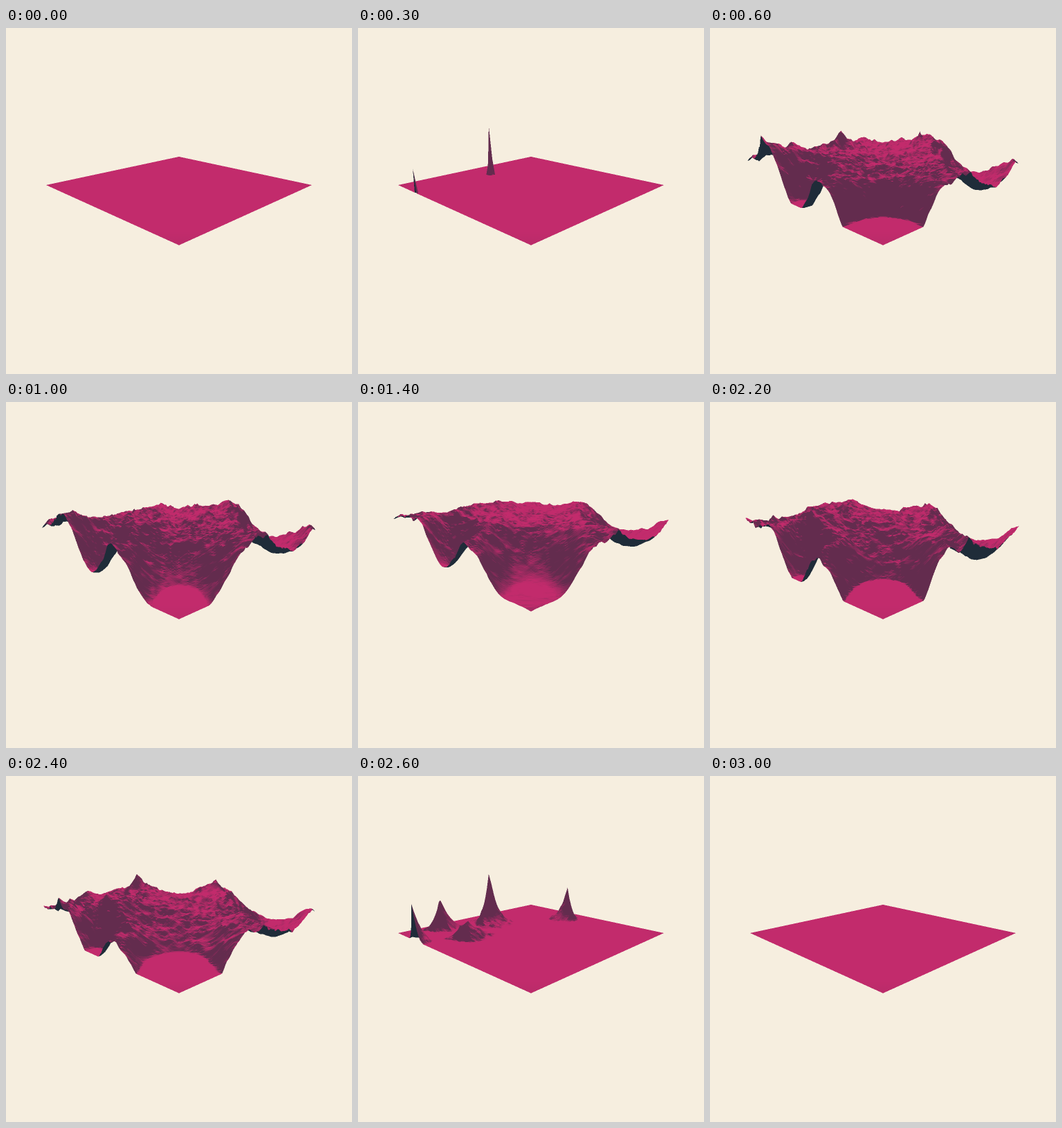
Animation, 500 px wide and 500 px high, one loop 3100 ms. Source, as an HTML page with a canvas:

```html
<!DOCTYPE html>
<html lang="en">
<head>
<meta charset="utf-8">
<title>Terrain</title>
<style>
  html, body { margin: 0; width: 100%; height: 100%; overflow: hidden; background: #f6eedf; }
  canvas { display: block; width: 500px; height: 500px; }
</style>
</head>
<body>
<canvas id="stage" width="500" height="500"></canvas>
<script>
const LOOP = 3100, STEP = 100, MIDDLE = 1500;
const N = 110, V = N + 1;          // grid cells and vertices per side
const SIZE = 1000;                 // supersampled buffer
const PEAK = 0.4, LIGHT = 2, RIM = 0.76;
const PINK = [194, 43, 108], SLATE = [31, 44, 57], PAPER = [246, 238, 223];

const clamp = (x, a = 0, b = 1) => Math.min(b, Math.max(a, x));
const mix = (a, b, k) => a + (b - a) * k;
const smooth = x => { x = clamp(x); return x * x * (3 - 2 * x); };
const pack = c => (255 << 24 | c[2] << 16 | c[1] << 8 | c[0]) >>> 0;

// Hollows sunk into the plateau; the front one deepens backwards over time
const hollows = t => [
  { l: 0, d: -0.86, floor: 0.13, rim: 0.42, reach: mix(0.75, 1.9, smooth((t - 500) / 500)), depth: 1 },
  { l: -0.53, d: -0.42, floor: 0, rim: 0.24, reach: 1.3, depth: 0.85 },
  { l: 0.7, d: 0.05, floor: 0, rim: 0.34, reach: 2, depth: 0.75 },
  { l: 0.02, d: 0.95, floor: 0, rim: 0.25, reach: 1, depth: 0.45 }
];
// Hills, each with a sharp summit that outlasts the rest
const summits = [
  { l: -0.334, d: 0.3, h: 0.4, r: 0.06 },
  { l: 0.307, d: 0.436, h: 0.3, r: 0.05 },
  { l: -0.7, d: 0.13, h: 0.28, r: 0.075 },
  { l: -0.81, d: -0.19, h: 0.31, r: 0.05 },
  { l: -0.45, d: -0.12, h: 0.15, r: 0.1 }
];

// Everything below this level is flattened
const cutLevel = s => 1.35 * (s / 1250) ** 2.5 - 0.12;

function hash(i, j, k) {
  let h = Math.imul(i, 374761393) ^ Math.imul(j, 668265263) ^ Math.imul(k, 1274126177);
  h = Math.imul(h ^ h >>> 13, 1274126177);
  return ((h ^ h >>> 16) >>> 0) / 2147483648 - 1;
}

function noise(x, y, z) {
  const i = Math.floor(x), j = Math.floor(y), k = Math.floor(z);
  const u = smooth(x - i), v = smooth(y - j), w = smooth(z - k);
  const row = (b, c) => mix(hash(i, b, c), hash(i + 1, b, c), u);
  const slab = c => mix(row(j, c), row(j + 1, c), v);
  return mix(slab(k), slab(k + 1), w);
}

// One soft octave, then sharp-crested ones
function rough(x, y, z) {
  let sum = 0, amp = 0.5, f = 4.5;
  for (let o = 0; o < 4; o++) {
    const n = noise(x * f + 31, y * f + 17, z + o * 7);
    sum += amp * (o ? 1.5 * (0.35 - Math.abs(n)) : n);
    amp *= 0.55;
    f *= 2;
  }
  return sum;
}

function land(l, d, basins) {
  let n = RIM;
  for (const s of summits) n += 0.15 * Math.exp(-((l - s.l) ** 2 + (d - s.d) ** 2) / 0.04);
  for (const b of basins) {
    const q = Math.hypot(l - b.l, (d - b.d) / b.reach);
    n *= 1 - b.depth * (1 - smooth((q - b.floor) / (b.rim - b.floor)));
  }
  return n;
}

const grid = () => new Float32Array(V * V);
const L = grid(), D = grid(), H = grid(), X = grid(), Y = grid(), Z = grid(), spike = grid();
for (let a = 0, i = 0; a < V; a++) {
  for (let b = 0; b < V; b++, i++) {
    L[i] = (a - b) / N;
    D[i] = 1 - (a + b) / N;
    for (const s of summits) {
      spike[i] = Math.max(spike[i], s.h * Math.exp(-Math.hypot(L[i] - s.l, D[i] - s.d) / s.r));
    }
  }
}

function shape(t) {
  const s = Math.abs(t - MIDDLE), cut = cutLevel(s), late = smooth((s - 750) / 300);
  const basins = hollows(t);
  let top = -1;
  for (let i = 0; i < H.length; i++) {
    const n = land(L[i], D[i], basins);
    const m = n + (0.05 + 0.4 * n) * rough(L[i], D[i], t / 900);
    H[i] = mix(m, 0.8, 0.8 * late) + late * spike[i];
    top = Math.max(top, H[i]);
  }
  const k = top > cut ? PEAK / (top - cut) : 0;
  const f = SIZE * 0.384;
  for (let i = 0; i < H.length; i++) {
    H[i] = Math.max(0, H[i] - cut) * k;
    Z[i] = 1 + 0.359 * D[i] - 0.127 * H[i];
    X[i] = SIZE / 2 + f * L[i] / Z[i];
    Y[i] = SIZE / 2 - f * (0.3333 * D[i] + 0.943 * H[i] + 0.12) / Z[i];
  }
}

const ctx = document.getElementById("stage").getContext("2d");
const big = document.createElement("canvas");
big.width = big.height = SIZE;
const bigCtx = big.getContext("2d");
const image = bigCtx.createImageData(SIZE, SIZE);
const pixels = new Uint32Array(image.data.buffer);
const depth = new Float32Array(SIZE * SIZE);
const paper = pack(PAPER), under = pack(SLATE);

function shade(p, q, r) {
  const ax = L[q] - L[p], ay = D[q] - D[p], az = H[q] - H[p];
  const bx = L[r] - L[p], by = D[r] - D[p], bz = H[r] - H[p];
  const nx = az * by - ay * bz, ny = ax * bz - az * bx, nz = ay * bx - ax * by;
  const lx = -(L[p] + L[q] + L[r]) / 3, ly = -(D[p] + D[q] + D[r]) / 3;
  const lz = LIGHT - (H[p] + H[q] + H[r]) / 3;
  const dot = (nx * lx + ny * ly + nz * lz) / (Math.hypot(nx, ny, nz) * Math.hypot(lx, ly, lz));
  const k = clamp(1.9 * dot - 0.75, 0.42, 1);
  return pack(PINK.map((c, i) => Math.round(mix(SLATE[i], c, k))));
}

function triangle(p, q, r) {
  const x0 = X[p], y0 = Y[p], x1 = X[q], y1 = Y[q], x2 = X[r], y2 = Y[r];
  const area = (x1 - x0) * (y2 - y0) - (y1 - y0) * (x2 - x0);
  if (Math.abs(area) < 1e-6) return;
  const color = area > 0 ? shade(p, q, r) : under;
  const left = Math.ceil(Math.min(x0, x1, x2) - 0.5), right = Math.floor(Math.max(x0, x1, x2) - 0.5);
  const up = Math.ceil(Math.min(y0, y1, y2) - 0.5), down = Math.floor(Math.max(y0, y1, y2) - 0.5);
  for (let y = up; y <= down; y++) {
    for (let x = left; x <= right; x++) {
      const px = x + 0.5, py = y + 0.5;
      const u = ((px - x0) * (y2 - y0) - (py - y0) * (x2 - x0)) / area;
      const v = ((x1 - x0) * (py - y0) - (y1 - y0) * (px - x0)) / area;
      if (u < -1e-5 || v < -1e-5 || u + v > 1.00001) continue;
      const z = Z[p] + u * (Z[q] - Z[p]) + v * (Z[r] - Z[p]);
      const i = y * SIZE + x;
      if (z < depth[i]) {
        depth[i] = z;
        pixels[i] = color;
      }
    }
  }
}

function draw(t) {
  shape(t);
  pixels.fill(paper);
  depth.fill(9);
  for (let a = 0; a < N; a++) {
    for (let b = 0; b < N; b++) {
      const p = a * V + b, q = p + V;
      triangle(p, q, p + 1);
      triangle(q, q + 1, p + 1);
    }
  }
  bigCtx.putImageData(image, 0, 0);
  ctx.drawImage(big, 0, 0, 500, 500);
}

let shown = -1;
function tick() {
  const step = Math.floor(performance.now() % LOOP / STEP);
  if (step !== shown) {
    shown = step;
    draw(step * STEP);
  }
  requestAnimationFrame(tick);
}
tick();
</script>
</body>
</html>
```
